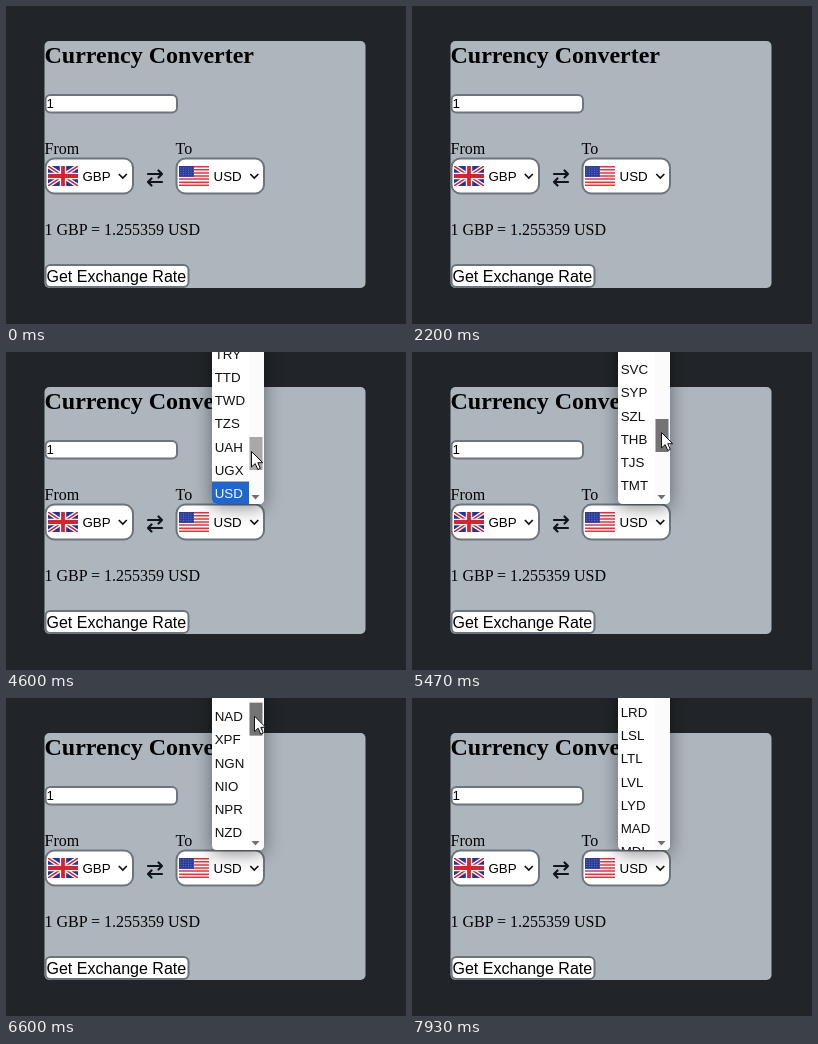
Recreate the animation shown at these times as an HTML page. Size 400 by 318 pixels, loop 8 s.

```html
<!DOCTYPE html>
<html lang="en">
<head>
<meta charset="utf-8">
<title>Currency Converter</title>
<style>
  html, body { margin: 0; width: 100%; height: 100%; overflow: hidden; background: #212529; }
  svg { display: block; width: 400px; height: 318px; }
  text { font: 16px "Liberation Serif", "Times New Roman", serif; white-space: pre; }
  .title { font-size: 24px; font-weight: bold; }
  .ui { font: 13.333px "Liberation Sans", Arial, sans-serif; }
  .button { font-size: 16px; }
  .field { fill: #fff; stroke: #6c757d; stroke-width: 2; }
  .chevron { fill: none; stroke: #111; stroke-width: 1.7; }
  .shadow { filter: drop-shadow(0 4px 9px rgba(0, 0, 0, .45)); }
  .cursor { fill: #fff; stroke: #111; stroke-width: 1; stroke-linejoin: round; }
</style>
</head>
<body>
<svg viewBox="0 0 400 318">
  <defs>
    <clipPath id="flagClip"><rect width="30" height="20"/></clipPath>
    <clipPath id="listClip"><path d="M206 0H258V147q0 5-5 5H211q-5 0-5-5Z"/></clipPath>
  </defs>

  <rect width="400" height="318" fill="#212529"/>
  <rect x="38.5" y="35" width="321" height="247" rx="5" fill="#adb5bd"/>
  <text class="title" x="38.5" y="57">Currency Converter</text>

  <rect class="field" x="39.5" y="89" width="131.5" height="17.5" rx="5"/>
  <text class="ui" x="40.5" y="102">1</text>

  <text x="38.5" y="148">From</text>
  <text x="169.5" y="148">To</text>

  <rect class="field" x="39.5" y="152.5" width="87.5" height="35" rx="9"/>
  <g transform="translate(42 160)" clip-path="url(#flagClip)">
    <rect width="30" height="20" fill="#25349c"/>
    <path d="M0 0 30 20M30 0 0 20" stroke="#fff" stroke-width="4.2"/>
    <path d="M0 0 30 20M30 0 0 20" stroke="#d8232e" stroke-width="1.5"/>
    <path d="M15 0V20M0 10H30" stroke="#fff" stroke-width="6.4"/>
    <path d="M15 0V20M0 10H30" stroke="#d8232e" stroke-width="3.8"/>
  </g>
  <text class="ui" x="76.5" y="175">GBP</text>
  <path class="chevron" d="m112.8 168 4 4 4-4"/>

  <g fill="none" stroke="#111418" stroke-width="2.2" stroke-linecap="round" stroke-linejoin="round">
    <path d="M142 168H156M152.5 164.5l3.5 3.5-3.5 3.5"/>
    <path d="M156 176H142M145.500 172.500l-3.500 3.500 3.500 3.500"/>
  </g>

  <rect class="field" x="170.5" y="152.5" width="87.500" height="35" rx="9"/>
  <g transform="translate(173 160)" clip-path="url(#flagClip)">
    <rect width="30" height="20" fill="#fff"/>
    <path id="stripes" stroke="#e0343e" stroke-width="1.54"/>
    <rect width="15" height="10.8" fill="#2a3c9c"/>
    <path d="M1.500 2H15M1.500 4.200H15M1.500 6.400H15M1.500 8.600H15" stroke="#8793cf" stroke-width=".8" stroke-dasharray=".8 1.700"/>
  </g>
  <text class="ui" x="207.5" y="175">USD</text>
  <path class="chevron" d="m244.300 168 4 4 4-4"/>

  <text x="38.500" y="229">1 GBP = 1.255359 USD</text>

  <rect class="field" x="39.500" y="259" width="143" height="22" rx="5"/>
  <text class="ui button" x="40.500" y="276">Get Exchange Rate</text>

  <g id="popup">
    <path class="shadow" d="M206-30H258V147q0 5-5 5H211q-5 0-5-5Z" fill="#fff"/>
    <g clip-path="url(#listClip)">
      <g id="rows"></g>
      <rect x="243" width="15" height="152" fill="#fbfbfb"/>
      <rect id="thumb" x="243.500" width="13" height="33"/>
      <path d="M245.500 143h8l-4 4.500Z" fill="#707070"/>
    </g>
  </g>

  <path id="arrow" class="cursor" d="M.5.5V16L4.200 12.600 6.800 18.500 9.300 17.400 6.800 11.700H11.700Z"/>
  <path id="hand" class="cursor" d="M-1.500 1.500Q0-1 1.500 1.500V7Q3.500 5.500 4.500 7.500 6.500 6.500 7.300 8.500 9.500 8 9.500 10.500V14Q9.500 17 7.500 19.500H0L-4.500 13Q-6.500 10.500-4.700 9.700-3.300 9.300-1.500 12ZM1.500 7V10M4.500 7.500V10.500M7.300 8.500V11"/>
</svg>

<script>
const LOOP = 8000, FPS = 15, ROW = 23.25, OPEN = 3600, DRAG = 4650;
const $ = id => document.getElementById(id);
const codes = ("LKR LRD LSL LTL LVL LYD MAD MDL MGA MKD MMK MNT MOP MRO MUR MVR MWK MXN MYR MZN " +
  "NAD XPF NGN NIO NPR NZD OMR PAB PEN PGK PHP PKR PLN PYG QAR RON RSD RUB RWF SAR SBD SCR SDG SEK SGD " +
  "SKK SLL SOS SRD STD SVC SYP SZL THB TJS TMT TND TOP TRY TTD TWD TZS UAH UGX USD").split(" ");

// Rows are laid out upwards from the last code, whose centre is the group's origin.
$("rows").innerHTML = codes.map((code, i) => {
  const y = (i - codes.length + 1) * ROW;
  const chosen = code === "USD";
  const bar = chosen ? `<rect x="206" y="${y - 11.5}" width="37" height="23.5" fill="#1e66d0"/>` : "";
  return `${bar}<text class="ui" x="208.700" y="${y + 5}" fill="${chosen ? "#fff" : "#111"}">${code}</text>`;
}).join("");

$("stripes").setAttribute("d",
  Array.from({ length: 7 }, (_, i) => `M0 ${(2 * i + .5) * 20 / 13}H30`).join(""));

const pointerPath = [[2400, 279, 272], [2600, 271, 264], [2670, 264, 257], [3000, 247, 171],
  [3130, 246, 168], [3650, 246, 168], [4250, 246, 104], [4600, 245, 99], [5470, 249, 79],
  [6600, 248, 17], [8000, 248, -23]];
const scrollPath = [[DRAG, 141], [5470, 343.5], [6600, 1041], [7930, 1478.7]];

function sample(path, time, column) {
  const next = path.findIndex(key => key[0] > time);
  if (next === 0) return path[0][column];
  if (next < 0) return path[path.length - 1][column];
  const a = path[next - 1], b = path[next];
  return a[column] + (b[column] - a[column]) * (time - a[0]) / (b[0] - a[0]);
}

const show = (id, visible) => $(id).setAttribute("visibility", visible ? "visible" : "hidden");
const move = (id, x, y) => $(id).setAttribute("transform", `translate(${x} ${y})`);

function draw(now) {
  const time = Math.floor((now % LOOP + 5) * FPS / 1000) * 1000 / FPS;
  const scroll = sample(scrollPath, time, 1);
  const thumbY = 85 - (scroll - 141) / 11.2;
  const x = sample(pointerPath, time, 1);
  const y = time > DRAG ? thumbY + 13 : sample(pointerPath, time, 2);
  const onSelect = time > 2900 && time < 3700;

  show("popup", time >= OPEN);
  move("rows", 0, scroll);
  $("thumb").setAttribute("y", thumbY);
  $("thumb").setAttribute("fill", time > DRAG ? "#747474" : time > 4200 ? "#a8a8a8" : "#c1c1c1");
  show("arrow", time >= 2400 && !onSelect);
  show("hand", onSelect);
  move("arrow", x, y);
  move("hand", x, y);
}

const start = performance.now();
function tick() {
  draw(performance.now() - start);
  requestAnimationFrame(tick);
}
tick();
</script>
</body>
</html>
```
